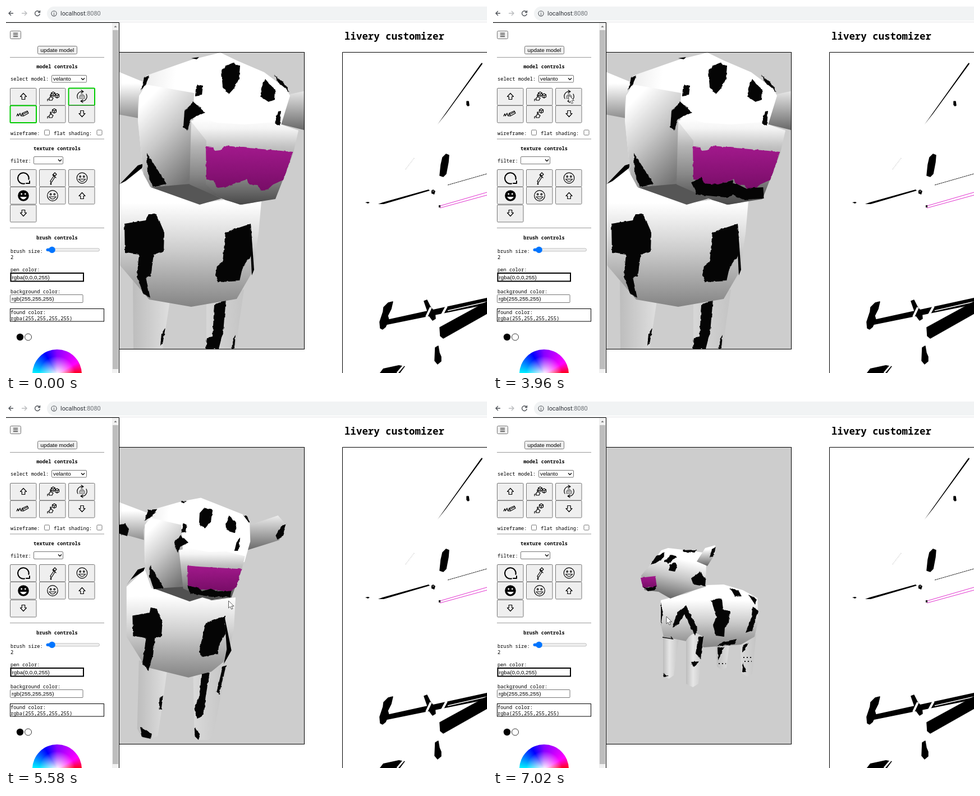
Animation of 857x654 px, one loop 7.2 s. Source, as an HTML page:

```html
<!DOCTYPE html>
<html lang="en">
<head>
<meta charset="utf-8">
<title>livery customizer</title>
<style>
html, body { margin: 0; width: 100%; height: 100%; overflow: hidden; background: #fff; }
main { position: relative; width: 857px; height: 654px; max-width: 100%; max-height: 100%; overflow: hidden; contain: strict; }
svg { position: absolute; left: 0; top: 0; display: block; }
.mono { font: 8.75px "Noto Sans Mono", "DejaVu Sans Mono", monospace; }
.head { font-weight: 700; text-anchor: middle; }
.sans { font: 9.85px "Liberation Sans", Arial, sans-serif; }
.url { font: 10.9px Roboto, sans-serif; }
.title { font: 700 17.45px "Noto Sans Mono", monospace; }
.btn { fill: #efefef; stroke: #767676; }
.field { fill: #fff; stroke: #767676; }
.on { stroke: #0c0; stroke-width: 2; }
.line { fill: none; stroke: #000; stroke-width: 1.2; stroke-linejoin: round; stroke-linecap: round; }
.k { fill: #050505; filter: url(#rough); }
.pink { fill: url(#pinkFill); filter: url(#rough); }
.brush { fill: none; stroke: #050505; stroke-width: 20; stroke-linejoin: round; stroke-dasharray: 1 2; filter: url(#rough); }
.blob { stroke: #000; stroke-width: 1.5; stroke-linejoin: round; }
.wheel { position: absolute; left: 47px; top: 612px; width: 88px; height: 42px;
  background: radial-gradient(circle at 44px 44px, #fff, #fff0 32px),
    conic-gradient(at 44px 44px, #80f, #f0f 60deg, #f00 90deg, #ff0 150deg, #0f0 210deg, #0ff 270deg, #00f 330deg, #80f);
  clip-path: circle(44px at 44px 44px); }
</style>
</head>
<body>
<main>
<svg width="857" height="654" viewBox="0 0 857 654">
<defs>
  <linearGradient id="down" x2="0" y2="1"><stop offset=".25" stop-color="#fff"/><stop offset=".6" stop-color="#cbcbcb"/><stop offset="1" stop-color="#848484"/></linearGradient>
  <linearGradient id="flank" x2="0" y2="1"><stop offset=".18" stop-color="#fff"/><stop offset=".45" stop-color="#c4c4c4"/><stop offset="1" stop-color="#797979"/></linearGradient>
  <linearGradient id="ear" x2="0" y2="1"><stop offset=".2" stop-color="#fff"/><stop offset="1" stop-color="#666"/></linearGradient>
  <linearGradient id="side" x2="1" y2=".1"><stop stop-color="#b0b0b0"/><stop offset=".07" stop-color="#eee"/><stop offset=".25" stop-color="#fff"/></linearGradient>
  <linearGradient id="cheek" x1=".2" x2=".75" y2="1"><stop offset=".1" stop-color="#fff"/><stop offset=".5" stop-color="#c8c8c8"/><stop offset="1" stop-color="#747474"/></linearGradient>
  <linearGradient id="snout" x2="0" y2="1"><stop stop-color="#fff"/><stop offset=".12" stop-color="#f4f4f4"/><stop offset=".33" stop-color="#c2c2c2"/><stop offset=".65" stop-color="#8f8f8f"/><stop offset="1" stop-color="#484848"/></linearGradient>
  <linearGradient id="face" y1=".8" x2=".9" y2=".25"><stop stop-color="#a2a2a2"/><stop offset=".3" stop-color="#9d9d9d"/><stop offset=".62" stop-color="#cfcfcf"/><stop offset=".9" stop-color="#fff"/></linearGradient>
  <linearGradient id="profile" x1=".7" y1=".1" x2=".45" y2="1"><stop offset=".15" stop-color="#fff"/><stop offset=".55" stop-color="#c4c4c4"/><stop offset="1" stop-color="#666"/></linearGradient>
  <linearGradient id="leg"><stop stop-color="#bdbdbd"/><stop offset=".4" stop-color="#e6e6e6"/><stop offset="1" stop-color="#c4c4c4"/></linearGradient>
  <linearGradient id="pinkFill" x2="0" y2="1"><stop stop-color="#a2198c"/><stop offset="1" stop-color="#780d67"/></linearGradient>
  <filter id="rough" filterUnits="userSpaceOnUse" x="190" y="70" width="360" height="560" color-interpolation-filters="sRGB">
    <feTurbulence type="fractalNoise" baseFrequency=".16" seed="4"/>
    <feDisplacementMap in="SourceGraphic" scale="4" xChannelSelector="R" yChannelSelector="G"/>
  </filter>
  <clipPath id="view"><path d="M202 83H531V611H202z"/></clipPath>
  <path id="arrow" class="line" d="M0-5.5L5.5.5H2.7V5.5H-2.7V.5H-5.5z"/>
  <path id="cube" class="line" d="M0-4L3.5-2V2L0 4-3.5 2V-2zM-3.5-2L0 0 3.500-2M0 0V4"/>
  <path id="hand" class="line" d="M-6 7V3L-4 1.500V-3L-2.500-3V1L1 3-1 7zM-6 5H-9V8"/>
  <g id="smile" class="line"><circle r="9.3"/><circle cx="-3.3" cy="-2.5" r="1.3"/><circle cx="3.3" cy="-2.5" r="1.3"/><path d="M-6 2Q0 10 6 2z"/></g>
  <path id="drop" d="M-3-1.5L0 1.5 3-1.5" fill="none" stroke="#111" stroke-width="1.5"/>
</defs>

<!-- browser bar -->
<rect x="73" y="1" width="820" height="25" rx="12.5" fill="#f1f3f4"/>
<path d="M0 28.5H857" stroke="#e1e3e5"/>
<path d="M13 13H5M9 9L5 13 9 17" fill="none" stroke="#50545a" stroke-width="1.4"/>
<path d="M28 13H37M33 9L37 13 33 17" fill="none" stroke="#babcbe" stroke-width="1.4"/>
<path d="M59.5 10.5A4.4 4.4 0 1 0 60.3 14M60.5 8V11.5H57" fill="none" stroke="#50545a" stroke-width="1.4"/>
<g fill="none" stroke="#50545a" stroke-width="1.1"><circle cx="85.5" cy="13.3" r="4.6"/><path d="M85.5 12.7V16M85.5 10.5V11.6"/></g>
<text class="url" x="97" y="17" fill="#30343a">localhost<tspan fill="#6b7075">:8080</tspan></text>

<!-- texture sheet -->
<text class="title" x="603" y="60">livery customizer</text>
<path d="M599.5 660V82.5H860" fill="none" stroke="#000"/>
<path d="M769 211L846 103 848 101 849 103 784 192z"/>
<path class="blob" d="M821 170L824 170 825 177 823 178 821 176z"/>
<path class="blob" d="M778 270L784 264 789 266 788 278 784 299 779 304 773 302 775 283z"/>
<path d="M712 291L728 270" stroke="#777" stroke-width=".8" stroke-dasharray="1 2"/>
<path d="M787 319L857 299" stroke="#000" stroke-width=".9" stroke-dasharray="3 .6"/>
<path d="M758 329L761 327 765 330 763 336 758 334z"/><path d="M760 330h2" stroke="#fff"/>
<path d="M663 353L671 350 753 327 755 329 673 353z"/>
<path d="M640 350L645 349 648 350 645 352z"/>
<path d="M774 356L857 332M773 360L857 337" stroke="#e23bd0" stroke-width="1.1" fill="none"/>
<path d="M771 355h3v4h-3z"/>
<path class="blob" d="M667 574L666 563 672 545 673 537 681 529 689 527 686 540 680 552 682 559 676 572 671 576z"/>
<path d="M674 560L857 520V532L674 569z"/>
<path class="blob" d="M745 526L750 524 756 536 764 546 765 557 760 560 754 552z"/>
<path d="M749 554L757 537M777 550L785 535" stroke="#fff" stroke-width="4"/>
<path d="M787 543L857 527" stroke="#fff" stroke-width="1.3"/>
<path class="blob" d="M773 573L857 527V548L779 592 774 588z"/>
<path class="blob" d="M765 609L770 606 772 618 775 625 775 633 769 638 764 632z"/>
<path d="M666 654L672 646 700 640 711 642 702 654z"/><path d="M697 654L708 641" stroke="#fff" stroke-width="3"/>

<!-- model view -->
<rect x="201.5" y="82.5" width="330" height="529" fill="#cdcdcd" stroke="#000"/>
<g clip-path="url(#view)"><g id="model">
  <g id="near">
    <path fill="url(#leg)" d="M226 490L292 525 279 611H227zM357 525L424 505 409 611H357z"/>
    <path class="k" d="M371 532L392 523 387 580 379 611H356L358 592 368 590zM284 573L279 603 275 605 277 584zM409 586L407 610 402 611 404 594z"/>
    <path fill="#666" d="M236 285L262 325 345 353 388 345 450 346 400 375 260 360z"/>
    <path fill="url(#down)" d="M202 318L240 289 257 322 345 352 388 345 420 354 455 348 450 405 440 472 411 522 330 536 255 523 203 462z"/>
    <path d="M203 317L235 284 245 281 242 289 213 312z"/>
    <path class="k" d="M211 388L249 382 254 371 267 371 272 380 282 403 281 437 263 443 258 482 249 483 257 520 244 512 233 482 237 443 212 440z"/>
    <path class="k" d="M391 403L436 388 439 440 421 468 416 490 379 492 373 480 376 464 386 456z"/>
    <path d="M436 388L442 470 438 480 436 440z"/>
    <path fill="url(#ear)" d="M200 117L244 135 237 200 200 193zM497 159L535 151V222L483 209z"/>
    <path fill="url(#side)" d="M250 124L330 96 382 83 411 97 460 118 500 148 506 160 490 212 521 222 480 240 345 240 330 318 258 323 245 300 235 205 235 165z"/>
    <path fill="url(#cheek)" d="M237 160L250 140 335 155 331 318 258 323 245 300 235 205z"/>
    <path fill="#565656" d="M258 323L328 317 384 343 345 354z"/>
    <path fill="url(#snout)" d="M330 204L350 200 376 208 425 211 479 207 521 222 512 262 480 344 417 354 384 343 327 318z"/>
    <path fill="#555" opacity=".12" d="M330 206L357 240 356 318 384 343 327 318z"/>
    <path class="pink" d="M356 250L368 251 372 258 382 257 390 249 511 260 502 288 494 310 476 318 466 327 455 328 448 319 433 318 429 309 405 317 395 322 377 324 369 311 357 309z"/>
    <path class="k" d="M316 216L318 187 329 176 333 170 355 190 340 196 328 203 324 222zM341 140L351 142 349 159 337 161 338 149z"/>
    <path class="k" d="M384 116L390 107 405 101 417 108 415 130 407 146 397 157 386 145zM455 146L462 130 469 139 480 149 479 167 468 171 453 161zM484 188L490 187 488 213 479 209z"/>
    <path class="k" d="M251 262L286 317 262 322 252 298zM241 150L246 127 255 124 251 136zM478 123L498 140 505 153 485 136z"/>
    <path d="M330 93L344 91 340 95z"/>
    <path class="brush" id="strokeA" pathLength="1" d="M429 320L402 328 370 326 362 310"/>
    <path class="brush" id="strokeB" pathLength="1" d="M362 326L415 331 430 326 448 335 482 333"/>
  </g>
  <g id="front">
    <path fill="url(#leg)" d="M242 452L290 467 280 540 274 580 262 586 248 584 239 568zM334 474L391 460 368 580 360 587 341 587 336 578z"/>
    <path class="k" d="M348 474L362 472 355 515 352 544 341 551 336 534 345 512zM277 515L283 512 280 535 276 535zM244 565L264 577 262 585 248 582zM336 565L346 578 343 587 337 581zM384 463L390 460 378 510 374 505z"/>
    <path fill="#5b5b5b" d="M250 296L262 330 325 352 406 346 350 365 250 340z"/>
    <path fill="url(#down)" d="M221 327L252 297 263 329 328 350 348 345 365 350 406 345 403 400 391 450 365 471 326 481 253 463 221 412z"/>
    <path d="M221 324L240 298 252 294 250 300 228 315z"/>
    <path class="k" d="M231 376L260 371 262 362 272 364 282 388 280 411 269 414 266 442 258 470 248 458 254 414 232 410z"/>
    <path class="k" d="M355 389L388 376 389 407 378 425 376 441 350 446 344 438 347 425z"/>
    <path d="M387 376L399 435 386 458 391 433z"/>
    <path fill="url(#ear)" d="M202 181L260 203 252 248 202 234zM422 225L478 206 492 222 480 248 422 266z"/>
    <path class="k" d="M202 222L219 219 225 229 222 241 203 235zM474 240L485 222 492 220 487 241 477 247zM405 205L424 206 430 216 424 221z"/>
    <path fill="url(#side)" d="M262 197L315 182 347 176 370 185 418 204 430 220 431 250 421 285 330 295 320 330 269 330 252 285 250 230z"/>
    <path fill="url(#cheek)" d="M252 222L262 210 314 222 320 330 268 330 252 285z"/>
    <path fill="#515151" d="M268 330L318 327 350 345 328 352z"/>
    <path fill="url(#snout)" d="M310 265L325 261 360 268 390 267 422 275 416 300 399 345 365 349 350 345 317 330z"/>
    <path class="pink" d="M324 291L346 293 416 297 408 327 398 334 365 333 345 331 325 326z"/>
    <path class="k" d="M324 325L343 329 350 334 365 330 372 335 399 333 397 344 364 344 329 338z"/>
    <path class="k" d="M305 265L303 250 313 239 326 252 312 259 309 269zM317 219L324 222 322 234 313 235zM345 202L353 193 367 197 364 217 354 228 344 220zM389 220L395 207 408 219 405 235 390 230zM408 250L414 243 411 266 404 266z"/>
    <path class="k" d="M261 290L284 329 267 331 260 309zM251 215L258 197 273 195 264 208zM313 183L323 181 319 185z"/>
  </g>
  <g id="left">
    <path fill="url(#leg)" d="M351 545L365 552V611H352z"/><path d="M360 560h4l-1 51h-3z"/>
    <path fill="url(#face)" d="M380 99L335 121 280 163 248 213 232 237 202 236V333L232 328 262 319 332 357 385 333 506 293 468 185 443 130 410 99z"/>
    <path fill="#fff" opacity=".35" d="M280 164L335 122 380 102 350 145 265 205 233 240 202 253V236L232 237z"/>
    <path fill="#fff" d="M408 100L443 130 468 185 508 293 495 280 460 200z"/>
    <path class="k" d="M350 227L366 224 390 239 408 242 430 233 451 236 477 251 492 270 497 298 466 305 442 297 415 286 384 276 354 263z"/>
    <path fill="none" stroke="#ccc" stroke-width="2" d="M437 281L450 274M461 282L468 278"/>
    <path class="k" d="M255 228L262 203 271 196 280 198 277 219 268 235 257 239zM258 198L266 181 285 160 273 181z"/>
    <path fill="#aaa" d="M259 219L263 215 264 221 260 226z"/>
    <path d="M325 123L380 98 378 104 339 123zM474 193L487 211 504 292 496 278zM202 292L205 299 202 306zM202 321L208 331 202 333z"/>
    <path fill="url(#profile)" d="M387 82H408L413 190 384 183z"/><path fill="#777" opacity=".45" d="M399 82L408 82 413 190 401 186z"/>
    <path class="k" d="M384 169L413 181V190L384 179z"/>
    <path fill="url(#flank)" d="M326 362L372 331 395 319 500 294 535 288V609L460 595 380 559 331 538 309 480 314 420z"/>
    <path class="k" d="M322 420L336 403 345 390 346 404 397 550 379 552 334 430 325 469 317 490 312 480z"/>
    <path class="k" d="M484 360H535V550L515 549 519 512 526 485 503 476 502 451 511 438 497 400z"/>
    <path fill="url(#leg)" d="M383 555Q425 540 446 562 463 580 461 611H383z"/>
    <path class="k" d="M384 553L397 552 434 613H383z"/>
  </g>
  <g id="right">
    <path fill="url(#leg)" d="M202 480L246 496 243 611H202zM264 488L309 474 310 583 304 594 287 596 280 585z"/>
    <path class="k" d="M289 477L301 475 296 533 302 548 297 561 296 594 286 591 287 562 278 555 281 534 290 529z"/>
    <path fill="url(#down)" d="M202 339L242 349 285 355 314 345 326 432 320 460 297 481 240 499 202 488z"/>
    <path class="k" d="M202 402L218 390 227 375 239 378 253 401 252 431 243 434 242 460 236 464 239 497 225 499 212 487 216 438 202 437zM307 386L317 372 322 428 313 446 306 422z"/>
    <path d="M248 489L298 483 296 487z"/>
    <path fill="url(#profile)" d="M202 204L240 206 262 196 292 193 325 207 347 247 380 269 393 284 382 324 372 335 352 333 330 327 286 356 202 341z"/>
    <path fill="#444" opacity=".2" d="M208 338L259 337 304 305 350 315 372 335 330 327 286 356 202 341z"/>
    <path class="k" d="M202 203L214 204 209 215 202 216zM214 302L222 297 260 338 207 336zM313 208L323 211 330 235 322 232zM305 226L312 226 312 236 304 235zM293 257L300 243 318 249 321 265 309 272 303 263 295 267z"/>
    <path fill="#ddd" stroke="#aaa" d="M202 227L213 252 202 247z"/>
    <path d="M240 207Q227 235 222 278M231 210Q224 245 221 270" fill="none" stroke="#111" stroke-width="1.5" stroke-dasharray="6 5"/>
    <path class="pink" d="M353 282L392 287 384 323 370 318 352 315z"/>
    <path class="k" d="M349 316L355 312 359 319 383 319 379 330 363 330 349 325z"/><path d="M273 195h6l-3 2z"/>
  </g>
  <g id="far">
    <path fill="url(#leg)" d="M397 434H421L416 475 407 479 399 473zM440 430L469 415 462 487 453 491 443 485z"/>
    <path class="k" d="M400 440L412 438 407 450 401 462zM445 435L455 431 449 444 444 447zM446 465L451 484 444 483z"/>
    <path d="M402 468h13M446 457h16M448 464h13" stroke="#111" stroke-width="2" stroke-dasharray="2 4"/>
    <path fill="url(#leg)" d="M303 415L331 423 322 489 313 495 303 488z"/>
    <path fill="url(#down)" d="M299 355L345 343 382 328 411 327 445 337 471 351 473 390 466 420 442 434 376 439 344 428 304 420 297 390z"/>
    <path fill="url(#leg)" d="M344 427Q357 405 375 421L366 504 356 510 344 504z"/>
    <path class="k" d="M389 355L408 352 410 372 422 374 420 396 413 403 412 420 397 418 392 399 398 385zM319 403L329 376 344 364 352 381 365 407 360 418 341 381 331 397z"/>
    <path class="k" d="M422 333L437 337 443 348 431 349zM455 345L470 353 467 363zM463 365L472 374 462 409 450 413 460 388zM299 360L303 373 299 400zM410 429L435 424 431 433 400 437zM366 420L375 419 370 459 361 450zM353 465L368 464 357 474zM303 485L313 491 304 492z"/>
    <path d="M302 421L320 424 317 420" fill="none" stroke="#111" stroke-width="1.5"/>
    <path fill="url(#profile)" d="M264 311L284 287 300 266 312 262 347 266 374 270 380 283 379 331 345 341 316 352 295 340 270 337z"/>
    <path fill="url(#ear)" d="M363 286L378 262 396 257 396 272 382 294z"/>
    <path class="k" d="M281 291L291 276 307 269 302 281 288 290zM304 286L318 274 328 277 313 290zM337 266L362 265 360 270 340 269zM353 316L368 304 379 318 378 330 357 327zM386 279L390 264 397 260 394 274zM313 302L316 292 324 288 328 295 324 304z"/>
    <path class="pink" d="M263 315L289 312 292 331 267 333z"/>
    <path class="k" d="M267 331L276 334 291 329 288 337 276 339z"/>
  </g>
</g></g>

<!-- side panel -->
<path d="M-1 29.5H201.5V660H-1z" fill="#fff" stroke="#000"/>
<path d="M189 30H201V654H189z" fill="#f1f1f1"/><path d="M190 43H200V647H190z" fill="#bdbdbd"/><path d="M192.5 38L195 35 197.5 38z" fill="#777"/>
<path d="M7 91.5H175M7 237H175M7 395.5H175" stroke="#999"/>
<rect class="btn" x="7.5" y="44.5" width="19" height="14" rx="2"/><path d="M13 48.5H21M13 51.5H21M13 54.5H21" stroke="#000" stroke-width="1.2"/>
<rect class="btn" x="56.5" y="71.5" width="70" height="14" rx="2"/><text class="sans" x="61.5" y="82">update model</text>
<rect class="field" x="81.5" y="123.5" width="62" height="12.5" rx="1.5"/><text class="sans" x="84" y="133">velanto</text><use href="#drop" x="137" y="130"/>
<rect class="field" x="49.5" y="268.5" width="52" height="13" rx="1.5"/><use href="#drop" x="96" y="275"/>
<g id="buttons"></g>
<g class="mono">
  <text class="head" x="91" y="111">model controls</text><text x="8" y="133">select model:</text>
  <text x="8" y="230">wireframe:</text><text x="85" y="230">flat shading:</text>
  <text class="head" x="91" y="257">texture controls</text><text x="8" y="279">filter:</text>
  <text class="head" x="91" y="415.5">brush controls</text><text x="8" y="439.5">brush size:</text><text x="8" y="451">2</text>
  <text x="8" y="473">pen color:</text><text x="8" y="512">background color:</text>
  <text x="8" y="549">found color:</text><text x="8" y="559.5">rgba(255,255,255,255)</text>
</g>
<rect class="field" x="68.5" y="221" width="9" height="9" rx="1.5"/><rect class="field" x="162" y="221" width="9" height="9" rx="1.5"/>
<rect x="72.5" y="432" width="94" height="5" rx="2.5" fill="#efefef" stroke="#b2b2b2" stroke-width=".8"/><path d="M74 434.5H82" stroke="#0075ff" stroke-width="5" stroke-linecap="round"/><circle cx="82" cy="434.5" r="5.8" fill="#0075ff"/>
<rect x="8.5" y="476" width="129.5" height="14.5" fill="#fff" stroke="#000" stroke-width="2"/><text class="sans" x="10.5" y="486.5">rgba(0,0,0,255)</text>
<rect class="field" x="7.5" y="514.5" width="129.5" height="14" rx="1"/><text class="sans" x="10" y="525">rgb(255,255,255)</text>
<rect x="7.5" y="539.5" width="167" height="22.5" fill="none" stroke="#000"/>
<circle cx="25" cy="590" r="6.2"/><circle cx="39.5" cy="590" r="6" fill="#fff" stroke="#333"/>

<!-- button icons -->
<use href="#arrow" x="31" y="161"/><use href="#arrow" transform="translate(135.5 192)rotate(180)"/>
<use href="#arrow" x="135.5" y="338"/><use href="#arrow" transform="translate(31 369)rotate(180)"/>
<use href="#hand" x="83" y="161"/><use href="#cube" x="84" y="157"/><use href="#cube" x="91" y="160"/>
<use href="#hand" x="83" y="192"/><use href="#cube" x="86" y="187"/>
<g class="line"><path d="M128 165A8.5 8.5 0 0 1 137 152.5M143 157A8.5 8.5 0 0 1 134 169.5M134 150L138 152.5 134 155M137 167L133 169.5 137 172"/><path d="M131 160H140V165H131zM132.5 160Q135.5 153 138.5 160" fill="#bbb" style="stroke:#777"/></g>
<path class="line" d="M19 196L21 192 22 196 25 191 26 195M27 196L29 191 38 187 40 191 31 196zM29 191L31 196M30 193L38 189"/>
<path class="line" style="stroke-width:2" d="M33 316.6A9.8 9.8 0 1 1 40.5 309M36 316H42V312"/>
<path class="line" d="M84 300L87 297 90 300 87 303zM83 301L89 306M85 303L79 312 80 315 82 313 87 305"/><circle cx="80" cy="317" r="1.5"/>
<use href="#smile" x="135.5" y="306.5"/><use href="#smile" x="83" y="338"/>
<circle cx="31" cy="338" r="9.8"/><g fill="#fff"><circle cx="27.7" cy="335" r="1.4"/><circle cx="34.3" cy="335" r="1.4"/><path d="M25 340Q31 349 37 340z"/></g>
</svg>
<div class="wheel"></div>
<svg width="857" height="654"><path id="cursor" d="M0 0V13L3 10.3 5.2 15 7.5 14 5.3 9.5H9.5z" fill="#fff" stroke="#333" stroke-width=".8"/></svg>
</main>

<script>
const $ = id => document.getElementById(id);
const STEP = 180, LOOP = 7200;

const cells = [147, 178, 292, 323, 355].flatMap((y, row) =>
  [8, 60, 112].slice(0, row === 4 ? 1 : 3).map(x => [x, y]));
$("buttons").innerHTML = cells.map(([x, y]) =>
  `<rect class="btn" x="${x - .5}" y="${y - .5}" width="46.5" height="30.5" rx="1.5"/>`).join("");
const [lockBtn, penBtn] = [2, 3].map(i => $("buttons").children[i]);

// step, pose, offset x, offset y, scale
const views = [
  [0, "near", 0, 0, 1], [22, "near", 0, 0, 1], [23, "near", -10, 8, .9],
  [24, "front", 0, 0, 1.1], [25, "front", 0, 0, 1], [27, "front", 15, 20, 1.25],
  [28, "left", 30, 10, .9], [29, "left", 0, 0, 1], [30, "left", 15, 10, .88],
  [31, "front", 0, 5, 1.05], [32, "right", 18, 0, 1.03], [33, "right", 0, 0, 1],
  [34, "right", 10, 0, .92], [35, "front", 0, 10, .85], [36, "front", 5, 15, .72],
  [37, "far", 0, 0, 1.08], [39, "far", 0, 0, 1]
];
// step, cursor x, cursor y
const moves = [
  [1, 445, 345], [3, 425, 314], [9, 362, 306], [10, 378, 312], [17, 461, 329],
  [20, 31, 189], [22, 135, 159], [24, 375, 314], [25, 375, 314],
  [29, 359, 356], [33, 434, 356], [39, 309, 384]
];
const poses = ["near", "front", "left", "right", "far"];
const clamp = v => Math.max(0, Math.min(1, v));

function between(keys, n, from) {
  const i = keys.findLastIndex(k => k[0] <= n);
  const a = keys[i], b = keys[i + 1];
  if (!b || (from === 2 && a[1] !== b[1])) return a.slice(from);
  const f = (n - a[0]) / (b[0] - a[0]);
  return a.slice(from).map((v, j) => v + (b[j + from] - v) * f);
}

function draw(n) {
  const pose = views.findLast(v => v[0] <= n)[1];
  for (const id of poses) $(id).style.display = id === pose ? "" : "none";
  const [x, y, s] = between(views, n, 2);
  $("model").setAttribute("transform", `translate(${345 + x} ${346 + y})scale(${s})translate(-345 -346)`);

  for (const [id, start, span] of [["strokeA", 3, 6], ["strokeB", 10, 6]]) {
    const done = clamp((n - start) / span);
    $(id).style.strokeDashoffset = 1 - done;
    $(id).style.display = done ? "" : "none";
  }

  penBtn.classList.toggle("on", n < 20);
  lockBtn.classList.toggle("on", n < 22);
  $("cursor").style.display = n ? "" : "none";
  if (n) $("cursor").setAttribute("transform", `translate(${between(moves, n, 1)})`);
}

function tick() {
  draw(Math.floor(performance.now() % LOOP / STEP));
  requestAnimationFrame(tick);
}
tick();
</script>
</body>
</html>
```
